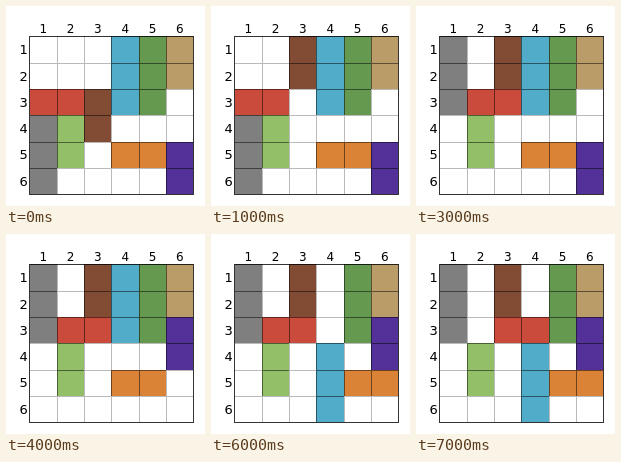
An HTML page for the animation above (8000 ms loop, 199 by 200 pixels).

```html
<!DOCTYPE html>
<html>
<head>
<meta charset="utf-8">
<title>Sliding blocks</title>
<style>
html, body { margin: 0; width: 100%; height: 100%; overflow: hidden; background: #fff; }
svg { display: block; width: 100vw; height: 100vh; }
text { font: 12px "DejaVu Sans", sans-serif; fill: #000; text-anchor: middle; }
.row { font-size: 13px; }
path { shape-rendering: crispEdges; }
</style>
</head>
<body>
<svg id="stage" viewBox="0 0 199 200" xmlns="http://www.w3.org/2000/svg"></svg>
<script>
const LOOP = 8000, STEP = 1000;
const X = [24, 51, 78, 105, 133, 160, 187];
const Y = [30, 57, 83, 109, 136, 162, 188];
const stage = document.getElementById('stage');

function add(tag, attrs, label) {
  const el = document.createElementNS('http://www.w3.org/2000/svg', tag);
  for (const k in attrs) el.setAttribute(k, attrs[k]);
  if (label) el.textContent = label;
  stage.appendChild(el);
  return el;
}

const box = (x, y, w, h) => `M${x} ${y}h${w}v${h}h${-w}z`;

// cell borders inside an area, one pixel wide, on the left and top of each cell
function gridPath(col, row, w, h) {
  const left = X[col], top = Y[row];
  let d = '';
  for (let c = Math.max(col, 1); c < col + w; c++) d += box(X[c], top, 1, Y[row + h] - top);
  for (let r = Math.max(row, 1); r < row + h; r++) d += box(left, Y[r], X[col + w] - left, 1);
  return d;
}

add('path', { d: gridPath(0, 0, 6, 6), 'fill-opacity': 0.27 });

// col, row, width and height in cells
const block = (fill, col, row, w, h) => ({
  col, row, w, h,
  body: add('path', { fill }),
  edges: add('path', { 'fill-opacity': 0.5 })
});

const blocks = {
  blue: block('#50acc9', 3, 0, 1, 3),
  green: block('#65994f', 4, 0, 1, 3),
  tan: block('#ba9c69', 5, 0, 1, 2),
  red: block('#ca4b3c', 0, 2, 2, 1),
  brown: block('#814b34', 2, 2, 1, 2),
  gray: block('#7f7f7f', 0, 3, 1, 3),
  lime: block('#94bf69', 1, 3, 1, 2),
  orange: block('#da8336', 3, 4, 2, 1),
  purple: block('#533198', 5, 4, 1, 2)
};

// one move per step: block, columns, rows
const moves = [
  ['brown', 0, -2],
  ['red', 1, 0],
  ['gray', 0, -3],
  ['purple', 0, -2],
  ['orange', 1, 0],
  ['blue', 0, 3],
  ['red', 1, 0]
];

add('path', {
  d: box(23, 30, 1, 159) + box(187, 30, 1, 159) + box(24, 30, 163, 1) + box(24, 188, 163, 1),
  'fill-opacity': 0.8
});

for (let i = 0; i < 6; i++) {
  add('text', { x: 37.3 + 27.3 * i, y: 27 }, i + 1);
  add('text', { x: 17.7, y: 48.2 + 26.3 * i, class: 'row' }, i + 1);
}

function draw(time) {
  const done = Math.floor((time % LOOP) / STEP);
  for (const name in blocks) {
    const b = blocks[name];
    let { col, row, w, h } = b;
    for (const [who, dx, dy] of moves.slice(0, done)) {
      if (who === name) { col += dx; row += dy; }
    }
    b.body.setAttribute('d', box(X[col], Y[row], X[col + w] - X[col], Y[row + h] - Y[row]));
    b.edges.setAttribute('d', gridPath(col, row, w, h));
  }
}

const start = performance.now();
function tick() {
  draw(performance.now() - start);
  requestAnimationFrame(tick);
}
tick();
</script>
</body>
</html>
```
